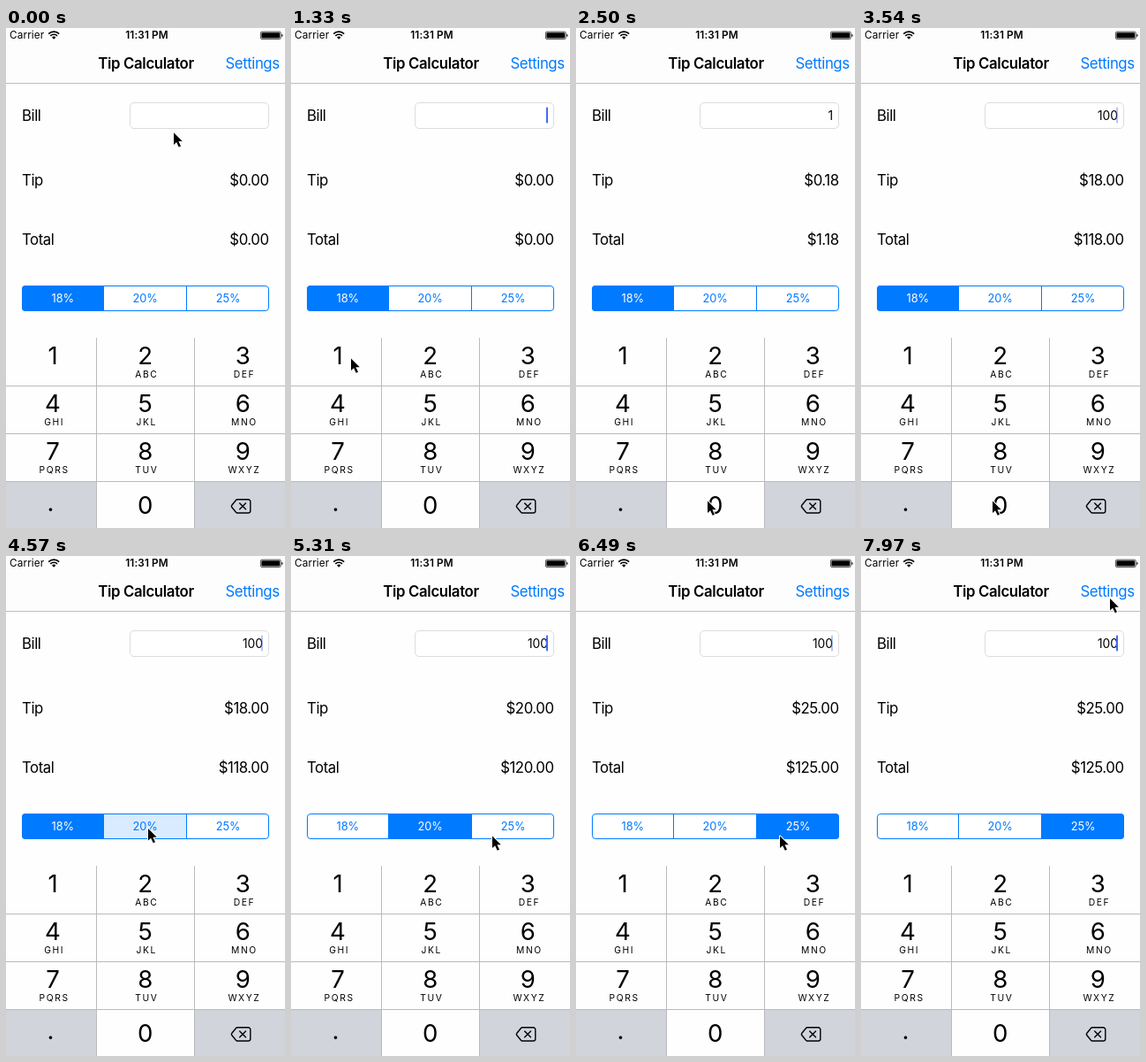
Animation, 316 px wide and 565 px high, one loop 8 s. Source, as an HTML page:

```html
<!DOCTYPE html>
<html lang="en">
<head>
<meta charset="utf-8">
<title>Tip Calculator</title>
<style>
  html, body { margin: 0; width: 100%; height: 100%; overflow: hidden; background: #fefefe; }
  svg { display: block; width: 316px; height: 565px; }
  text { font-family: Inter, Roboto, "Liberation Sans", sans-serif; font-size: 16.8px; letter-spacing: -.45px; }
  .title { font-weight: 600; letter-spacing: -.34px; }
  .status { font-size: 11.8px; letter-spacing: .1px; }
  .clock { font-weight: 600; }
  .field { font-size: 13.8px; letter-spacing: 0; }
  .option { font-size: 12.8px; letter-spacing: 0; }
  .digit { font-size: 27.6px; letter-spacing: 0; }
  .letters { font-size: 10.3px; letter-spacing: 1.6px; }
  .mid { text-anchor: middle; }
  .end { text-anchor: end; }
</style>
</head>
<body>
<svg id="stage" viewBox="0 0 316 565">
  <defs><clipPath id="pill"><rect x="18" y="291" width="280" height="29" rx="4"/></clipPath></defs>
</svg>
<script>
const BLUE = '#007aff', GREY = '#d1d5db';
const LOOP = 8000, FIRST = 289, STEP = 147.4;
const stage = document.getElementById('stage');

function add(tag, attrs, parent = stage) {
  const node = document.createElementNS('http://www.w3.org/2000/svg', tag);
  for (const key in attrs) node.setAttribute(key, attrs[key]);
  return parent.appendChild(node);
}
function label(x, y, content, style = '', fill = '#000') {
  const node = add('text', { x, y, class: style, fill });
  node.textContent = content;
  return node;
}
const box = (x, y, width, height, fill, more, parent) =>
  add('rect', { x, y, width, height, fill, ...more }, parent);
const path = (d, attrs) => add('path', { d, fill: 'none', stroke: '#000', ...attrs });

// Status and navigation bars
box(0, 0, 316, 62, '#fdfdfd');
box(0, 62, 316, 1, '#bcbcbe');
label(4, 12.3, 'Carrier', 'status');
label(159.5, 12.3, '11:31 PM', 'status clock mid');
path('M48.2 6.6a8.4 8.4 0 0 1 12 0M50.3 8.9a5.5 5.5 0 0 1 7.8 0', { 'stroke-width': 1.6 });
path('M52 10.6a3.2 3.2 0 0 1 4.4 0l-2.2 2.2z', { fill: '#000', stroke: 'none' });
box(288.4, 4.2, 22.8, 8.4, 'none', { rx: 1.6, stroke: '#000', 'stroke-width': .7 });
box(289.4, 5.2, 20.8, 6.4, '#000', { rx: .8 });
path('M312.4 6.8v3.2a1.7 1.7 0 0 0 0-3.2z', { fill: '#000', stroke: 'none' });
label(158.5, 46.3, 'Tip Calculator', 'title mid');
label(309.6, 46.3, 'Settings', 'end', BLUE);

// Form
[['Bill', 105], ['Tip', 178], ['Total', 245]].forEach(([name, y]) => label(18, y, name));
box(140.5, 84.5, 157, 29, '#fff', { rx: 4.5, stroke: '#dcdcdc' });
const bill = label(291, 104, '', 'field end');
const caret = box(289, 89.5, 2, 18, '#426bf2', { rx: .8 });
const tip = label(297.6, 178, '', 'end');
const total = label(297.6, 245, '', 'end');

// Rate selector
const rates = [18, 20, 25];
const edges = [18, 110.5, 204.5, 298];
const pill = add('g', { 'clip-path': 'url(#pill)' });
const options = rates.map((rate, i) => ({
  back: box(edges[i], 291, edges[i + 1] - edges[i], 29, '#fff', {}, pill),
  text: label([64.3, 157.7, 251.7][i], 310.2, rate + '%', 'option mid')
}));
edges.slice(1, 3).forEach(x => box(x - .5, 291, 1, 29, BLUE));
box(18.5, 291.5, 279, 28, 'none', { rx: 3.6, stroke: BLUE });

// Keypad
const cols = [0, 103, 214, 316], centres = [53, 157.7, 268.3];
const caps = ['', 'ABC', 'DEF', 'GHI', 'JKL', 'MNO', 'PQRS', 'TUV', 'WXYZ'];
const keys = {};
['1', '2', '3', '4', '5', '6', '7', '8', '9', '.', '0', 'del'].forEach((key, i) => {
  const c = i % 3, row = Math.floor(i / 3), y = 350 + row * 54;
  const side = row === 3 && c !== 1;
  keys[key] = box(cols[c], y, cols[c + 1] - cols[c], 55, side ? GREY : '#fefefe');
  if (key === 'del') return;
  const x = key === '.' ? 50.6 : centres[c];
  label(x, row < 3 ? y + 30 : key === '.' ? 546 : 549, key, 'digit mid');
  if (caps[i]) label(centres[c] + 1.6, y + 45, caps[i], 'letters mid');
});
[404, 458, 512].forEach(y => box(0, y, 316, 1, '#b9babd'));
[102, 213].forEach(x => box(x, 350, 1, 215, '#b9babd'));
path('M262 532.8h12.2a2.6 2.6 0 0 1 2.6 2.6v10a2.6 2.6 0 0 1-2.6 2.6H262q-.8 0-1.5-.7l-4.7-5.8q-.8-1.1 0-2.2l4.7-5.8q.7-.7 1.5-.7z'
  + 'M264.7 537l6.8 6.8m0-6.8l-6.8 6.8', { 'stroke-width': 1.4, 'stroke-linecap': 'round' });

const pointer = path('M0 0v13.6l3.1-2.9 2.6 5.6 2.3-1-2.6-5.5h4.4z', {
  fill: '#000', stroke: '#fff', 'stroke-width': 2, 'paint-order': 'stroke', 'stroke-linejoin': 'round'
});

// Timelines: [step, value...]
const route = [
  [0, 190, 118.3], [8, 68, 373.5], [10, 68, 373.5], [16, 149, 534.5], [23, 149, 534.5],
  [30, 161, 308], [32, 161, 308], [35, 228, 316.5], [36, 231, 316.5], [43, 231, 316.5],
  [50, 280, 52], [51, 282, 48]
];
const blink = [
  [0, 0], [1, 1], [5, .4], [6, 0], [8, 1], [14, .4], [15, 0], [17, 1], [23, .4], [24, 0], [26, 1],
  [30, .4], [31, 0], [33, 1], [36, .4], [37, 0], [40, 1], [43, .4], [44, 0], [46, 1],
  [50, .4], [51, 0], [53, 1]
];
const typed = [[0, ''], [10, '1'], [18, '10'], [19, '100']];
const pressed = [[0, ''], [9, '1'], [10, ''], [17, '0'], [19, '']];
const chosen = [[0, 0], [31, 1], [38, 2]];
const touched = [[0, -1], [30, 1], [31, -1], [37, 2], [38, -1]];

const at = (table, n) => table.filter(row => row[0] <= n).pop()[1];

function place(n) {
  const i = route.findIndex(stop => stop[0] > n);
  if (i < 0) return route[route.length - 1].slice(1);
  const [a, b] = [route[i - 1], route[i]];
  const p = (n - a[0]) / (b[0] - a[0]), e = p * p * (3 - 2 * p);
  return [1, 2].map(k => a[k] + (b[k] - a[k]) * e);
}

function draw(time) {
  const n = time < 300 ? 0 : 1 + Math.floor((time - FIRST) / STEP);
  const pick = at(chosen, n), touch = at(touched, n), value = at(typed, n);
  const gain = value * rates[pick] / 100;
  bill.textContent = value;
  tip.textContent = '$' + gain.toFixed(2);
  total.textContent = '$' + (+value + gain).toFixed(2);
  caret.setAttribute('opacity', at(blink, n));
  options.forEach(({ back, text }, i) => {
    back.setAttribute('fill', i === pick ? BLUE : i === touch ? '#d9ebff' : '#fff');
    text.setAttribute('fill', i === pick ? '#fff' : BLUE);
  });
  ['1', '0'].forEach(k => keys[k].setAttribute('fill', at(pressed, n) === k ? GREY : '#fefefe'));
  pointer.setAttribute('transform', `translate(${place(n)})`);
}

const start = performance.now();
function tick() {
  draw((performance.now() - start) % LOOP);
  requestAnimationFrame(tick);
}
tick();
</script>
</body>
</html>
```
